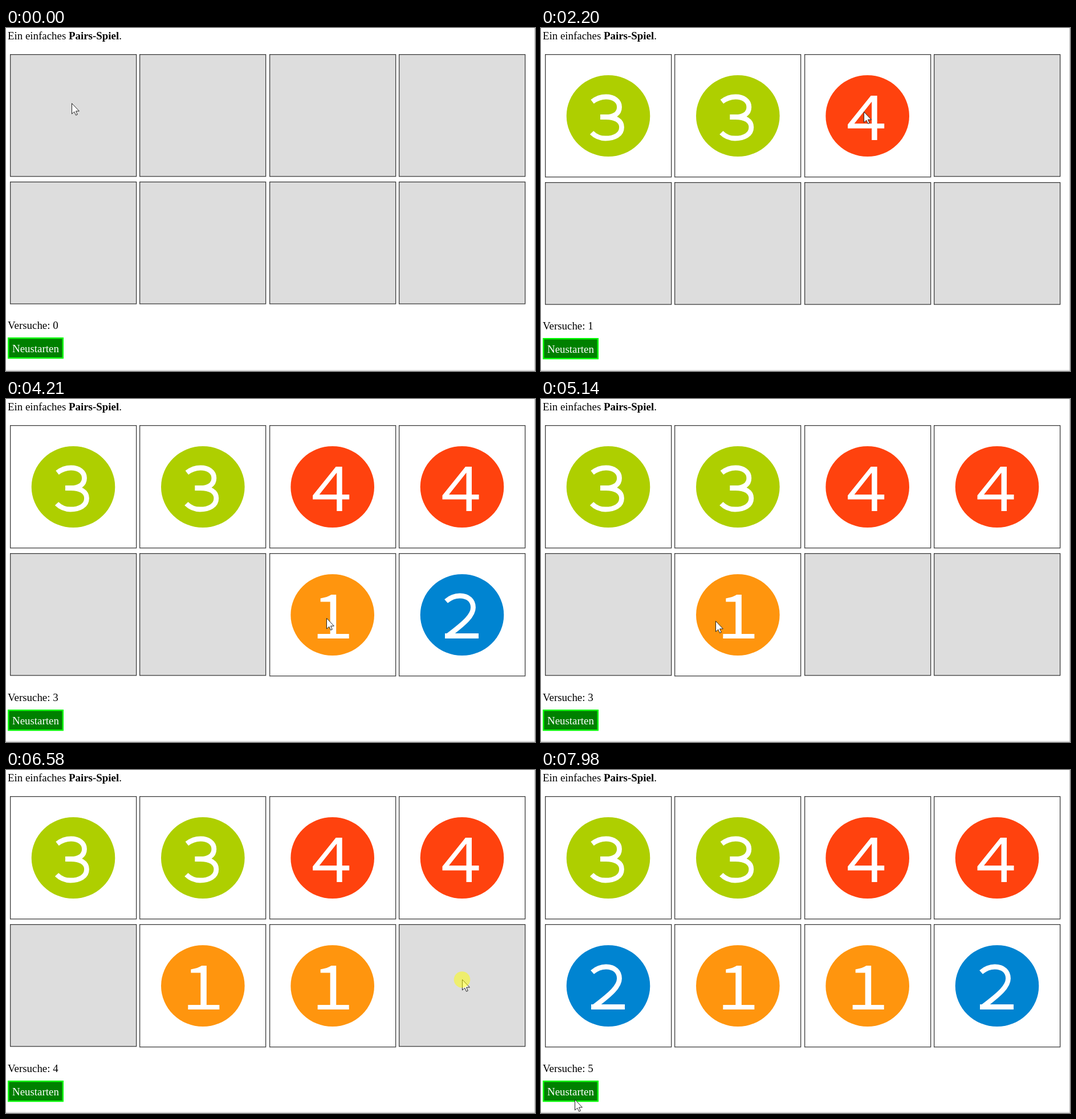
Animation, 928 px wide and 603 px high, one loop 8000 ms. Source, as an HTML page with a canvas:

```html
<!DOCTYPE html>
<html lang="de">
<head>
<meta charset="utf-8">
<title>Pairs-Spiel</title>
<style>
html, body { margin: 0; width: 100%; height: 100%; overflow: hidden; background: #fff; }
canvas { display: block; }
</style>
</head>
<body>
<canvas id="stage" width="928" height="603"></canvas>
<script>
const ctx = document.getElementById('stage').getContext('2d');
const LOOP = 8000;
const FLIP = 150;      // from a click to the open card
const HIDE = 500;      // how long a wrong pair stays open
const REST = 90;       // pause after a flip before the pointer leaves
const TRAVEL = 380;    // longest pointer move
const FONT = '18.9px "Liberation Serif", "Times New Roman", serif';
const DIGITS = '33442112';

// Digits are drawn around the middle of their disc.
const FACES = {
  1: { color: '#ff950e', fill: new Path2D('M-26 41.5V33.5H-4V-23H-21V-29Q-9 -31 -2 -35.5H6.5V33.5H29V41.5Z') },
  2: { color: '#0084d1', line: new Path2D('M-28 -24Q-17 -33.5 -4 -33.5C11 -33.5 19.5 -25 19.5 -13C19.5 1 5 14 -24 36M-30 37H29') },
  3: { color: '#aecf00', line: new Path2D('M-28 -25Q-17 -33.5 -4 -33.5C10 -33.5 19.5 -26 19.5 -15.5C19.5 -4 10 2 -4 2H-14M-4 2C12 2 23.5 8 23.5 20C23.5 33 11 39.5 -5 39.5C-15 39.5 -22 36.5 -29 29.5') },
  4: { color: '#ff420e', fill: new Path2D('M6 -35.5H17V13.5H29.5V22H17V42.5H7.5V22H-34.5V15ZM7.5 13.5V-25L-23 13.5Z') }
};
const ARROW = new Path2D('M.5 .5V19L4.8 15.2L7.6 21.3L10.3 20.1L7.6 14.1H13.4Z');

// Where the pointer arrives and when; with a card, it clicks there.
const STOPS = [
  { time: 180, x: 115, y: 132, card: 0 },
  { time: 1190, x: 323, y: 142, card: 1 },
  { time: 2050, x: 566, y: 147, card: 2 },
  { time: 2590, x: 786, y: 146, card: 3 },
  { time: 3430, x: 770, y: 389, card: 7 },
  { time: 4060, x: 562, y: 385, card: 6 },
  { time: 4990, x: 306, y: 390, card: 5 },
  { time: 5460, x: 226, y: 387 },
  { time: 5870, x: 485, y: 380, card: 6 },
  { time: 6580, x: 800, y: 368, card: 7 },
  { time: 7330, x: 124, y: 375, card: 4 },
  { time: 7980, x: 59, y: 579 }
];
const CLICKS = STOPS.filter(stop => 'card' in stop);

// Replays the game up to time t.
function gameAt(t) {
  const open = new Set(), grown = [0, 0];
  let attempts = 0, first = null;
  for (const { time, card } of CLICKS) {
    const flipped = time + FLIP;
    if (t < flipped) break;
    open.add(card);
    grown[card >> 2] = 1;
    if (first === null) {
      first = card;
      continue;
    }
    attempts++;
    if (DIGITS[first] !== DIGITS[card] && t >= flipped + HIDE) {
      open.delete(first);
      open.delete(card);
    }
    first = null;
  }
  return { open, grown, attempts };
}

function pointerAt(t) {
  const next = STOPS.findIndex(stop => t < stop.time);
  if (next < 0) return STOPS[STOPS.length - 1];
  const to = STOPS[next], from = STOPS[next - 1] || to;
  const leave = 'card' in from ? from.time + FLIP + REST : from.time;
  const start = Math.max(leave, to.time - TRAVEL);
  const p = Math.max(0, (t - start) / (to.time - start));
  const eased = p * p * (3 - 2 * p);
  return { x: from.x + (to.x - from.x) * eased, y: from.y + (to.y - from.y) * eased };
}

function text(string, x, y, color = '#000', weight = '') {
  ctx.font = `${weight} ${FONT}`;
  ctx.fillStyle = color;
  ctx.fillText(string, x, y);
  return x + ctx.measureText(string).width;
}

function box(x, y, w, h, border, lineColor, color) {
  ctx.fillStyle = lineColor;
  ctx.fillRect(x, y, w, h);
  ctx.fillStyle = color;
  ctx.fillRect(x + border, y + border, w - 2 * border, h - 2 * border);
}

function drawFace({ color, fill, line }, x, y) {
  ctx.save();
  ctx.translate(x, y);
  ctx.fillStyle = color;
  ctx.beginPath();
  ctx.ellipse(0, 0, 73.3, 71.5, 0, 0, 2 * Math.PI);
  ctx.fill();
  ctx.fillStyle = ctx.strokeStyle = '#fff';
  ctx.lineWidth = 8.8;
  if (fill) ctx.fill(fill, 'evenodd');
  else ctx.stroke(line);
  ctx.restore();
}

function drawCard(digit, i, open, shift) {
  const x = 7 + i % 4 * 227.35;
  const y = i < 4 ? 46 : 270 + shift;
  box(Math.round(x), y, 222.3, open ? 216.6 : 215.6, 1.3, '#3c3c3c', open ? '#fff' : '#ddd');
  if (open) drawFace(FACES[digit], x + 111, y + 108.5);
}

function drawPointer(t) {
  const { x, y } = pointerAt(t);
  ctx.save();
  ctx.translate(Math.round(x), Math.round(y));
  ctx.fillStyle = '#fff';
  ctx.fill(ARROW);
  ctx.strokeStyle = '#222';
  ctx.lineWidth = 1;
  ctx.stroke(ARROW);
  if (CLICKS.some(({ time }) => t >= time && t < time + FLIP)) {
    ctx.fillStyle = 'rgba(255, 255, 0, .5)';
    ctx.beginPath();
    ctx.arc(0, .5, 14.3, 0, 2 * Math.PI);
    ctx.fill();
  }
  ctx.restore();
}

function draw(t) {
  const { open, grown, attempts } = gameAt(t);
  ctx.fillStyle = '#fff';
  ctx.fillRect(0, 0, 928, 603);
  ctx.fillStyle = '#bdbdbd';
  ctx.fillRect(927, 0, 1, 603);
  ctx.fillRect(0, 601.5, 928, 1);

  let x = text('Ein einfaches ', 3, 20);
  x = text('Pairs-Spiel', x, 20, '#000', 'bold');
  text('.', x, 20);

  // A row grows by a pixel once one of its cards has been opened.
  [...DIGITS].forEach((digit, i) => drawCard(digit, i, open.has(i), grown[0]));
  const shift = grown[0] + grown[1];
  text('Versuche: ' + attempts, 3, 529 + shift);
  box(3, 544 + shift, 98, 37.4, 2.4, '#0f0', '#008000');
  text('Neustarten', 11, 570 + shift, '#fff');
  drawPointer(t);
}

function tick() {
  draw(performance.now() % LOOP);
  requestAnimationFrame(tick);
}
tick();
</script>
</body>
</html>
```
